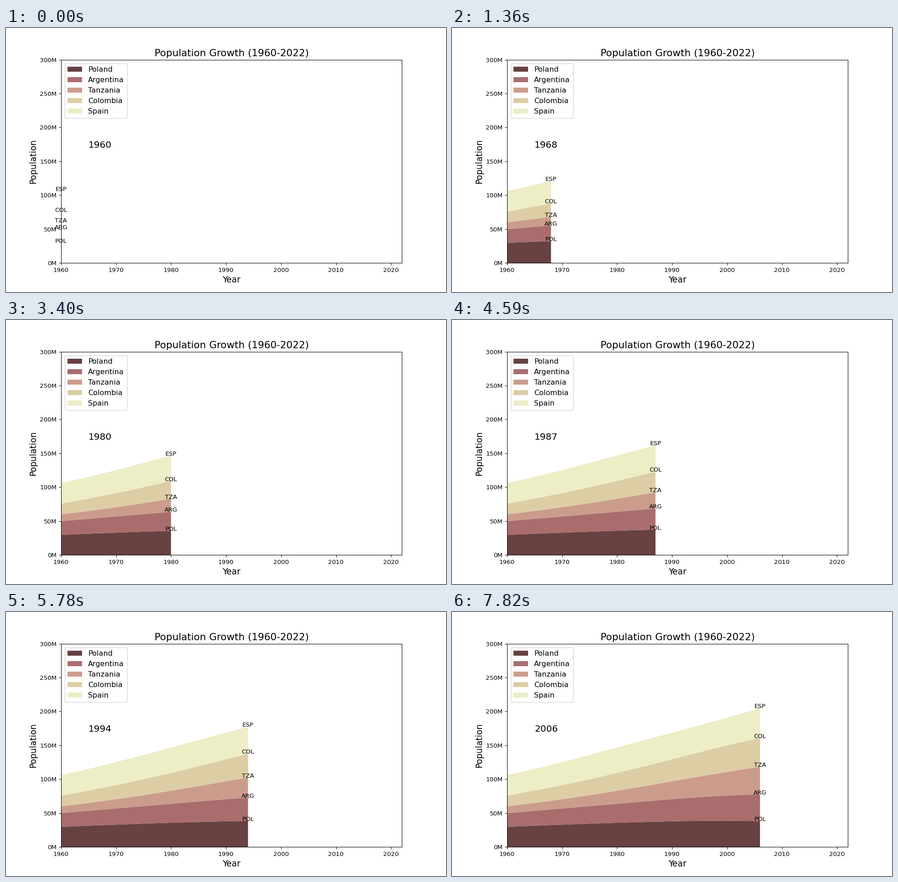
Write a matplotlib script that moves like this. It is 966 px wide and 580 px high and loops after 7.99 s.

```python
import matplotlib.pyplot as plt
import numpy as np
from matplotlib.animation import FuncAnimation
from matplotlib.patches import Patch

WIDTH, HEIGHT, DPI = 966, 580, 96.6
STEP_MS = 170
FIRST, LAST = 1960, 2006

# Millions of people in the key years; a smooth curve joins them
KEY_YEARS = np.array([1960, 1968, 1982, 1996, 2006])
COUNTRIES = [
    ("Poland", "POL", [29.6, 32.3, 36.2, 38.6, 38.1]),
    ("Argentina", "ARG", [20.3, 23.1, 28.9, 35.4, 39.5]),
    ("Tanzania", "TZA", [10.1, 12.8, 20.6, 31.3, 40.6]),
    ("Colombia", "COL", [15.7, 19.8, 27.4, 36.5, 42.7]),
    ("Spain", "ESP", [30.5, 33.1, 38.0, 39.9, 44.4]),
]


def curve(values):
    fit = np.polynomial.Polynomial.fit(KEY_YEARS, values, len(values) - 1)
    return fit(years)


years = np.arange(FIRST, LAST + 1)
people = np.array([curve(values) for *_, values in COUNTRIES])
tops = people.cumsum(axis=0)
colors = plt.cm.pink(np.linspace(0.1, 0.8, len(COUNTRIES)))

plt.rcParams["font.family"] = "DejaVu Sans"
# The small margin keeps the pixel size from being rounded down
fig, ax = plt.subplots(figsize=((WIDTH + 0.01) / DPI, (HEIGHT + 0.01) / DPI),
                       dpi=DPI)
ax.set_xlim(1960, 2022)
ax.set_ylim(0, 300)
ax.set_autoscale_on(False)
ax.set_yticks(range(0, 301, 50))
ax.yaxis.set_major_formatter("{x:.0f}M")
ax.set_title("Population Growth (1960-2022)", fontsize=16)
ax.set_xlabel("Year", fontsize=14)
ax.set_ylabel("Population", fontsize=14)
ax.legend(handles=[Patch(facecolor=color, label=name)
                   for color, (name, *_) in zip(colors, COUNTRIES)],
          loc="upper left", fontsize=12)

year_text = ax.text(1965, 170, "", fontsize=15)
tags = [ax.text(FIRST, 0, code, fontsize=10, ha="center")
        for _, code, _ in COUNTRIES]
layers = []


def draw(i):
    while layers:
        layers.pop().remove()
    if i > 0:
        layers.extend(ax.stackplot(years[:i + 1], people[:, :i + 1],
                                   colors=colors))
    ax.set_xlim(1960, 2022)
    ax.set_ylim(0, 300)
    year_text.set_text(str(years[i]))
    for tag, top in zip(tags, tops[:, i]):
        tag.set_position((years[i], top))
    return [*layers, year_text, *tags]


anim = FuncAnimation(fig, draw, frames=len(years), init_func=lambda: draw(0),
                     interval=STEP_MS, repeat=True, repeat_delay=0)
plt.show()
```
